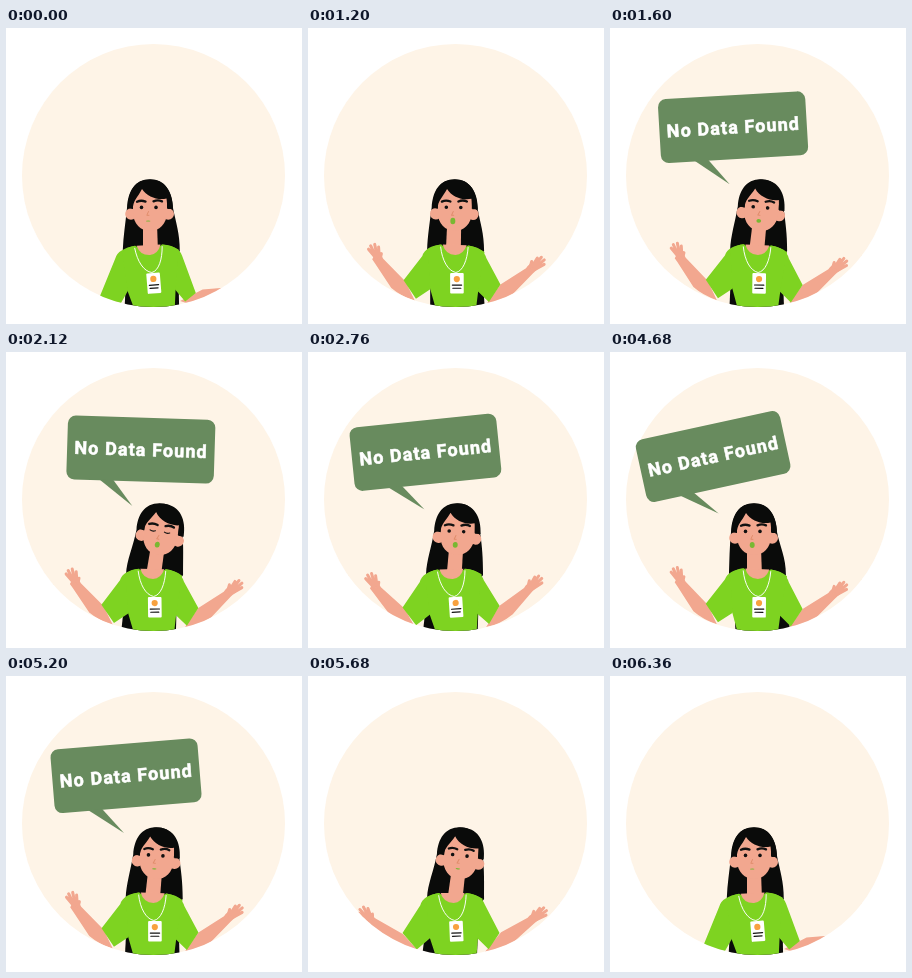
Animation, 296 px wide and 296 px high, one loop 6.4 s. Source, as an HTML page:

```html
<!DOCTYPE html>
<html lang="en">
<head>
<meta charset="utf-8">
<title>No Data Found</title>
<style>
  html, body { margin: 0; width: 100%; height: 100%; overflow: hidden; background: #fff; }
  svg { display: block; width: 100vw; height: 100vh; }
  .skin { fill: #f2a78f; }
  .finger { stroke: #f2a78f; stroke-width: 3; }
  .hair { fill: #0a0b0a; }
  .shirt { fill: #7ed321; }
  .line { fill: none; stroke-linecap: round; stroke-linejoin: round; }
  .ink { stroke: #111; }
  .green { fill: #688b5e; }
  text { font: 700 18px Roboto, Arial, sans-serif; letter-spacing: 1.1px; fill: #fff; stroke: #fff; stroke-width: .6; }
</style>
</head>
<body>
<svg viewBox="0 0 296 296">
  <defs><clipPath id="disc"><circle cx="147.5" cy="147.5" r="131.5"/></clipPath></defs>
  <circle cx="147.5" cy="147.5" r="131.5" fill="#fef4e7"/>

  <g clip-path="url(#disc)">
    <path id="longHair" class="hair" d="M122 222L119 285H174L172 222Z"/>
    <path id="backHair" class="hair"/>
    <path id="neck" class="skin"/>

    <g id="body">
      <g id="armL">
        <path class="skin" d="M97 255L74 233Q71 227 66 228L63 234L66 238L83 262Q93 270 107 274Z"/>
        <path class="line finger" d="M67 233L59 224M67 232L61 220.5M68 231L65 219M70 231L69 221.5M71 233L72 228"/>
      </g>
      <g id="armR">
        <path class="skin" d="M192 255L217 238Q221 231 228 233L229 238L224 243L205 264Q192 274 178 276Z"/>
        <path class="line finger" d="M221 237L222.5 231M223 236L228 227.5M225 236L232 226.5M226 237L235 229M226 239L235 233.5"/>
      </g>
      <path id="sleeveL" class="shirt"/>
      <path id="sleeveR" class="shirt"/>
      <path class="shirt" d="M118 223Q124 218 131 217Q145 225 159 217Q168 218 175 223L170 262L168 284H129L122 262Z"/>
      <path class="skin" d="M133 217Q136 227 146 227Q154 226.5 157 217Z"/>
      <path class="line" stroke="#fff" stroke-width=".95" d="M131 219.5C133 233 139 243 147 244.5C154 243 158 232 158.5 219"/>
      <g transform="rotate(-2 148 245)">
        <rect x="141.3" y="245" width="13.6" height="20.5" rx="1" fill="#fff"/>
        <circle cx="148" cy="251" r="3.1" fill="#f8a13f"/>
        <path class="line ink" stroke-width="1.2" d="M143.5 257H152.8M144 260.2H152"/>
      </g>
    </g>

    <g id="head">
      <circle class="skin" cx="125" cy="186" r="5.8"/>
      <circle class="skin" cx="162.2" cy="186" r="5.8"/>
      <path class="skin" d="M127 166V184C127 196 135 203 144 203C153 203 161 196 161 184V164L144 156Z"/>
      <path class="hair" d="M144 151.5C129 151.5 122 163 122 180L127 181C126.5 173 132 169 136 161C141 169 152 172.5 160.5 170.5C161 174 161 177 161.5 181L167 181C167 164 159 151.5 144 151.5Z"/>
      <path class="line ink" stroke-width="2.3" d="M131 173.8Q135 171.8 139.5 173.6M147.5 173.4Q152 171.4 156 173.4"/>
      <g id="open" fill="#111">
        <circle cx="135.5" cy="179.4" r="1.8"/>
        <circle cx="150" cy="179.4" r="1.8"/>
      </g>
      <path id="shut" class="line ink" stroke-width="1.1" d="M132.8 179.5Q135.5 181 138.2 179.5M147.3 179.5Q150 181 152.7 179.5"/>
      <path class="line" stroke="#e08d6c" stroke-width="1" d="M142.5 183.5L140.8 187.3H143"/>
      <ellipse id="mouth" cx="142.2" cy="193" fill="#79b832"/>
    </g>
  </g>

  <g id="bubble">
    <rect class="green" x="57" y="66" width="147.5" height="64" rx="8"/>
    <path class="green" d="M90 129H104L124 154.8Z"/>
    <text x="131" y="104.4" text-anchor="middle">No Data Found</text>
  </g>
</svg>

<script>
const LOOP = 6400, STEP = 40, SWAY = LOOP / 2;
const $ = id => document.getElementById(id);
const put = (id, name, value) => $(id).setAttribute(name, value);

// Easing helpers, all functions of time in ms
const mix = (a, b, k) => a + (b - a) * k;
const part = (t, from, to) => Math.min(1, Math.max(0, (t - from) / (to - from)));
const wave = (t, period) => Math.cos(2 * Math.PI * t / period);
const ramp = (t, from, to) => .5 - .5 * Math.cos(Math.PI * part(t, from, to));
const hump = (t, peak, half) => ramp(t, peak - half, peak) - ramp(t, peak, peak + half);
const spring = (t, from, to, s) => {
  const x = part(t, from, to) - 1;
  return 1 + (s + 1) * x ** 3 + s * x ** 2;
};

function drawBody(t, rock) {
  const up = spring(t, 120, 1000, 1) - ramp(t, 5500, 6120);
  const down = 1 - up;
  const sleeve = (neck, shoulder, hem, cuff, pit, chest) =>
    `M${neck} 217Q${mix(neck, shoulder, .85)} 219 ${shoulder} 229L${hem}L${cuff}L${pit} 262L${chest} 235Z`;

  put('sleeveL', 'd', sleeve(132, 113 - 2 * down, [95 - 2 * down, 254 + 14 * down], [108 + 4 * down, 272 + 6 * down], 122, 135));
  put('sleeveR', 'd', sleeve(158, 177 + down, [192 - 2 * down, 255 + 12 * down], [181 - 2 * down, 273 + 2 * down], 169, 155));
  put('armL', 'transform', `translate(${3 * down} ${11 * down}) rotate(${-70 * down} 99 265)`);
  put('armR', 'transform', `translate(0 ${4 * down}) rotate(${32 * down} 186 266)`);
  put('body', 'transform', `rotate(${rock} 147 270)`);
}

function drawHair(turn, swing) {
  const top = 144 + turn, low = turn * .45 + swing * .35, drop = turn * .25;
  put('longHair', 'transform', `rotate(${-swing} 146 215)`);
  put('backHair', 'd',
    `M${top} 151.3C${top - 15} 151.3 ${122 + turn} 163 ${121 + turn} ${180 - drop}` +
    `C${119.5 + turn * .8} 195 ${117.5 + low} 208 ${117 + low} 222L${124 + low} 230H${169 + low}` +
    `L${174 + low} 223C${174 + low} 205 ${170 + turn * .8} 195 ${167 + turn} ${180 + drop}` +
    `C${166 + turn} 163 ${top + 15} 151.3 ${top} 151.3Z`);
}

function drawHead(t, turn) {
  const chin = 144 + turn * .8, base = 144.5 + turn * .3;
  put('head', 'transform', `translate(${turn} 0) rotate(${turn ** 2 * .1} 144 190)`);
  put('neck', 'd', `M${chin - 7} 196L${base - 7.5} 224H${base + 7.5}L${chin + 7} 196Z`);

  const blink = t >= 2040 && t < 2200;
  put('open', 'opacity', blink ? 0 : 1);
  put('shut', 'opacity', blink ? 1 : 0);

  const talking = t >= 880 && t < 5080;
  const gape = talking ? .5 + .5 * wave(t - 1200, 320) : 0;
  put('mouth', 'rx', mix(2.3, 2.5, gape));
  put('mouth', 'ry', mix(.6, 3.3, gape));
}

function drawBubble(t) {
  const size = spring(t, 1210, 1510, 2) - ramp(t, 5460, 5660);
  const tilt = -7 - 5.3 * ramp(t, 2400, 4760) + 8.8 * hump(t, 2100, 900) + 11 * hump(t, 5500, 800);
  put('bubble', 'visibility', size > .01 ? 'visible' : 'hidden');
  put('bubble', 'transform', `rotate(${tilt} 147 229.5) translate(124 154.8) scale(${size}) translate(-124 -154.8)`);
}

function draw(t) {
  const rock = -2.6 * wave(t, SWAY);
  const turn = 9.5 * hump(t, 2100, 1400) + 9 * hump(t, 5500, 800);
  drawBody(t, rock);
  drawHair(turn, 2.5 + 1.2 * rock - .8 * turn);
  drawHead(t, turn);
  drawBubble(t);
}

const start = performance.now();
function tick() {
  const t = (performance.now() - start) % LOOP;
  draw(Math.floor(t / STEP) * STEP);
  requestAnimationFrame(tick);
}
tick();
</script>
</body>
</html>
```
